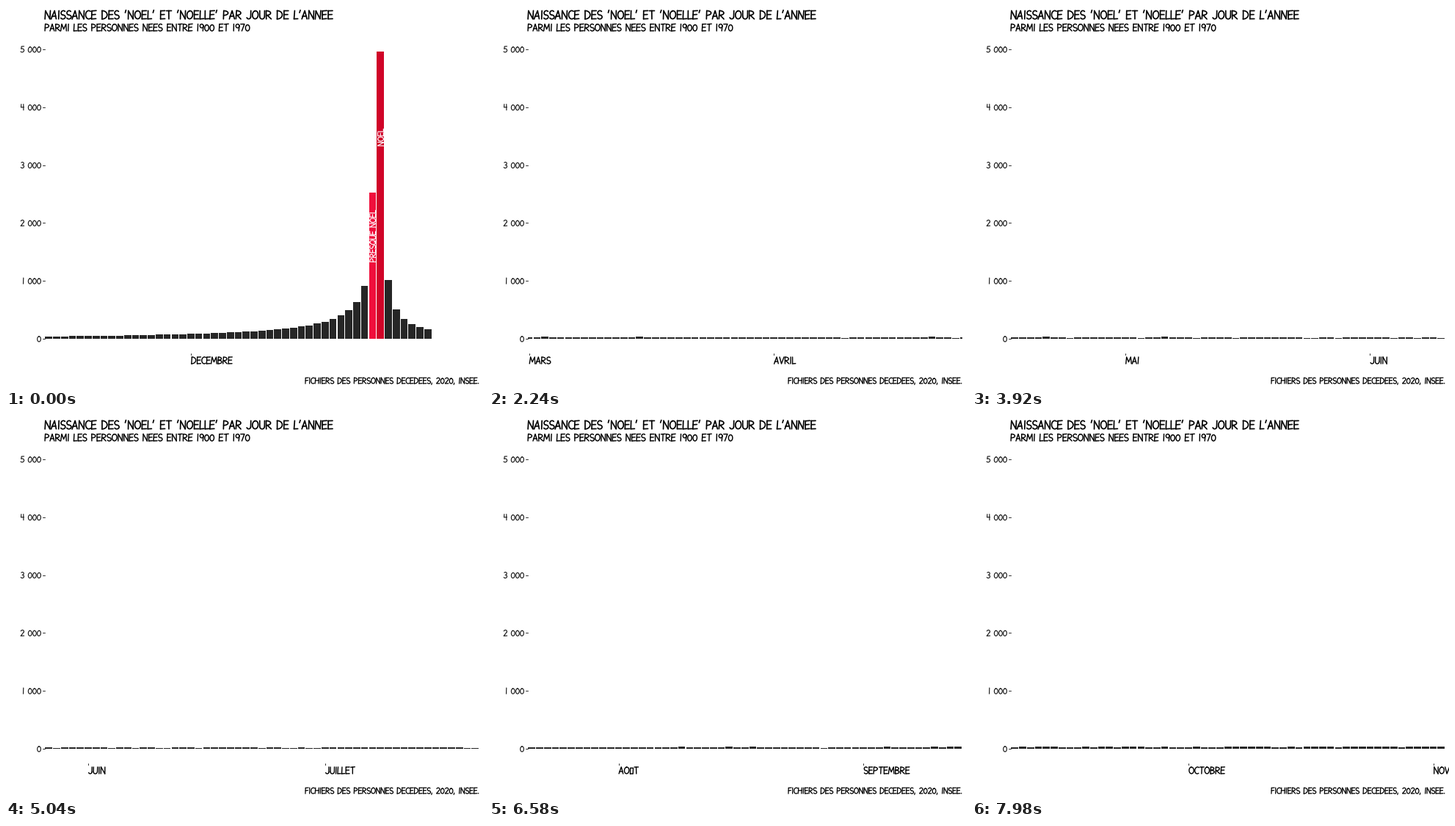
A matplotlib script for the animation above (8 s loop, 650 by 520 pixels).

```python
import numpy as np
import matplotlib.pyplot as plt
from matplotlib.animation import FuncAnimation
from matplotlib.collections import LineCollection, PolyCollection

W, H, DPI = 650, 520, 100
TICK_MS, LOOP_MS, STEP_MS = 20, 8000, 140
X0, X1, Y0 = 52.8, 644.7, 453
SPAN = 55                       # days in view
DAY = (X1 - X0) / SPAN
UNIT = 0.0788                   # pixels per birth
AXIS_Y = 473
INK, RED, DARK_RED = "#262626", "#f00f3c", "#d00428"
rng = np.random.default_rng(12)

# --- hand lettering -------------------------------------------------------
CAP, MID = 9.2, 4.8
FONT = {" ": (5, ())}


def glyph(char, advance, *strokes):
    FONT[char] = (advance, strokes)


def pen(*points):
    return np.array(points, dtype=float)


def stem(x):
    return pen((x, 0), (x, CAP))


def dash(y, end):
    return pen((.8, y), (end, y + .2))


def arc(cx, cy, rx, ry, start, end):
    a = np.radians(np.linspace(start, end, 16))
    return np.column_stack([cx + rx * np.cos(a), cy + ry * np.sin(a)])


left_stem, right_stem = stem(.8), stem(6.2)
ring = arc(3.7, 4.6, 3.2, 4.5, 100, 460)
bowl = arc(.9, 6.6, 4.8, 2.5, 90, -90)

glyph("A", 7, pen((.2, 0), (3.2, CAP), (5.9, 0)), dash(3, 5))
glyph("B", 7, left_stem, arc(.8, 7, 4.3, 2.2, 90, -90), arc(.8, 2.4, 5.1, 2.4, 90, -90))
glyph("C", 6.5, arc(4, 4.6, 3.5, 4.6, 55, 302))
glyph("D", 7.5, left_stem, arc(.8, 4.6, 5.6, 4.6, 92, -92))
glyph("E", 6.5, left_stem, dash(9, 5.6), dash(MID, 5), dash(.1, 5.7))
glyph("F", 6, left_stem, dash(9, 5.3), dash(MID, 4.6))
glyph("H", 7.5, left_stem, right_stem, dash(MID, 6.2))
glyph("I", 3, stem(1.3))
glyph("J", 6, pen((4.7, CAP), (4.7, 2.3)), arc(2.5, 2.3, 2.2, 2.2, 0, -160))
glyph("L", 5.5, left_stem, dash(.1, 5))
glyph("M", 9, pen((.5, 0), (1.4, CAP), (4.2, 2.4), (7, CAP), (8, 0)))
glyph("N", 7.5, left_stem, right_stem, pen((.8, CAP), (6.2, 0)))
glyph("O", 7.8, ring)
glyph("P", 7, left_stem, bowl)
glyph("Q", 7.8, ring, pen((4, 2.4), (6.8, -1.2)))
glyph("R", 7.2, left_stem, bowl, pen((2, 4.1), (6.3, 0)))
glyph("S", 6.5, arc(3.1, 6.8, 2.4, 2.4, 40, 270), arc(3.1, 2.2, 2.6, 2.2, 90, -150))
glyph("T", 7, dash(9, 6.4), stem(3.4))
glyph("U", 7.2, pen((.8, CAP), (.8, 3)), arc(3.5, 3, 2.7, 3, 180, 360),
      pen((6.2, 3), (6.2, CAP)))
glyph("V", 7, pen((.2, CAP), (3.1, 0), (6.2, CAP)))
glyph("\u25af", 5.5, np.array([.8, 0]) + np.outer([0, 1, 1, 0, 0], [3.8, 0])
      + np.outer([0, 0, 1, 1, 0], [0, 7.8]))
glyph("0", 7, arc(3.2, 4.1, 2.7, 4.1, 95, 455))
glyph("1", 3.5, stem(1.4))
glyph("2", 6.7, arc(3, 6.8, 2.4, 2.3, 160, -30), pen((5, 5.6), (.6, .1), (5.8, .2)))
glyph("3", 6.5, arc(2.8, 6.9, 2.2, 2.2, 140, -90), arc(2.8, 2.4, 2.6, 2.4, 90, -150))
glyph("4", 6.5, pen((1.2, CAP), (.8, 4.4), (5.2, 4.6)), stem(4.6))
glyph("5", 6.5, pen((5.2, CAP), (1.4, 9), (1.1, 5.3)), arc(2.6, 2.9, 2.9, 2.8, 120, -140))
glyph("7", 6.5, pen((.5, 9), (5.5, CAP), (2.2, 0)))
glyph("9", 6.5, arc(3, 6.6, 2.3, 2.5, 0, 360), pen((5.3, 6.6), (4.6, 0)))
glyph(",", 3, pen((1.3, 1), (.7, -1.6)))
glyph(".", 3, pen((1.1, .1), (1.3, .7)))
glyph("'", 3.5, pen((1.7, 9.8), (.9, 7)))


def letter(text, x, y, size, align=0, upright=False):
    """Slightly shaky strokes of a text; align 0 left, 0.5 centre, 1 right."""
    width = sum(FONT[c][0] for c in text) - 1
    pos, out = -align * width, []
    for c in text:
        advance, strokes = FONT[c]
        slant, tilt = rng.normal((.03, 0), .025)
        for s in strokes:
            u = (s[:, 0] + slant * (s[:, 1] - MID) + pos) * size
            v = (s[:, 1] + tilt * (s[:, 0] - advance / 2)) * size
            out.append(np.column_stack([x - v, y - u] if upright else [x + u, y - v]))
        pos += advance
    return out


# --- births per day of a leap year ---------------------------------------
LEAP, EVE, NOEL = 60, 359, 360
days = np.arange(1, 367)
before = np.maximum(NOEL - days, 1)
after = np.maximum((days - NOEL) % 366, 1)
births = 29 + 7 * np.cos(2 * np.pi * (days - 345) / 366) + rng.normal(0, 4, 366)
births = np.maximum(births, 1700 * before ** -.85 - 30)
births = np.maximum(births, 1015 / after)
births[days > NOEL] = 1015 / after[days > NOEL]
births[days == LEAP] /= 4
births[days == EVE] = 2525
births[days == NOEL] = 4960
colors = np.where(days == NOEL, DARK_RED, np.where(days == EVE, RED, INK))

MONTHS = ("JANVIER FEVRIER MARS AVRIL MAI JUIN JUILLET AO\u25afT SEPTEMBRE "
          "OCTOBRE NOVEMBRE DECEMBRE").split()
firsts = np.arange("2020-01", "2021-01", dtype="datetime64[M]").astype("datetime64[D]")
STARTS = (firsts - firsts[0]).astype(int) + 1
month_strokes = [letter(m, .4, 487, 1) for m in MONTHS]
bar_strokes = {d: letter(t, 4.4, Y0 - .7 * births[d - 1] * UNIT, .88, .5, True)
               for d, t in ((EVE, "PRESQUE NOEL"), (NOEL, "NOEL"))}

# --- stage ----------------------------------------------------------------
fig = plt.figure(figsize=(W / DPI, H / DPI), dpi=DPI, facecolor="white")
ax = fig.add_axes([0, 0, 1, 1])
ax.set(xlim=(0, W), ylim=(H, 0))
ax.axis("off")


def lines(segments, px, color="black", snap=False):
    c = LineCollection(segments, colors=color, linewidths=px * 72 / DPI,
                       capstyle="round", joinstyle="round", snap=snap)
    return ax.add_collection(c, autolim=False)


lines(letter("NAISSANCE DES 'NOEL' ET 'NOELLE' PAR JOUR DE L'ANNEE", 52.5, 17.7, 1.23), 1.7)
lines(letter("PARMI LES PERSONNES NEES ENTRE 1900 ET 1970", 52.5, 34, 1.03), 1.45)
lines(letter("FICHIERS DES PERSONNES DECEDEES, 2020, INSEE.", 644.5, 514, .865, 1), 1.25)
for n in range(6):
    y = Y0 - n * 1000 * UNIT
    lines(letter(f"{n} 000" if n else "0", 47.5, y + 4, .88, 1), 1.15, "#1a1a1a")
    lines([[(50, y), (52.5, y)]], 1, "#333333", True)

bars = ax.add_collection(PolyCollection([], edgecolors="none", snap=True), autolim=False)
bar_labels = lines([], 1.15, "white")
month_ticks = lines([], 1, "#333333", True)
month_labels = lines([], 1.4)


def view_left(step):
    """First day in view: the year's end once, then a scroll from January."""
    if step == 0:
        return 317.5
    return np.interp(step, [1, 3, 24, 57], [7.5, 17.5, 87.5, 252.5])


def update(i):
    left = view_left(i * TICK_MS // STEP_MS)

    def to_x(day):
        return X0 + (day - left) * DAY

    seen = days[(days > left - .45) & (days < left + SPAN + .45)]
    verts = []
    for d in seen:
        a, b = np.clip([to_x(d - .45), to_x(d + .45)], X0, X1)
        top = Y0 - births[d - 1] * UNIT
        verts.append([(a, Y0), (a, top), (b, top), (b, Y0)])
    bars.set_verts(verts)
    bars.set_facecolor(list(colors[seen - 1]))

    bar_labels.set_segments([s + (to_x(d), 0) for d, strokes in bar_strokes.items()
                             if d in seen for s in strokes])
    shown = [(to_x(d), s) for d, s in zip(STARTS, month_strokes)
             if left <= d <= left + SPAN]
    month_ticks.set_segments([[(x, AXIS_Y), (x, AXIS_Y + 2)] for x, _ in shown])
    month_labels.set_segments([s + (x, 0) for x, strokes in shown for s in strokes])
    return bars, bar_labels, month_ticks, month_labels


anim = FuncAnimation(fig, update, frames=LOOP_MS // TICK_MS, interval=TICK_MS,
                     repeat=True, repeat_delay=0, blit=False)
plt.show()
```
